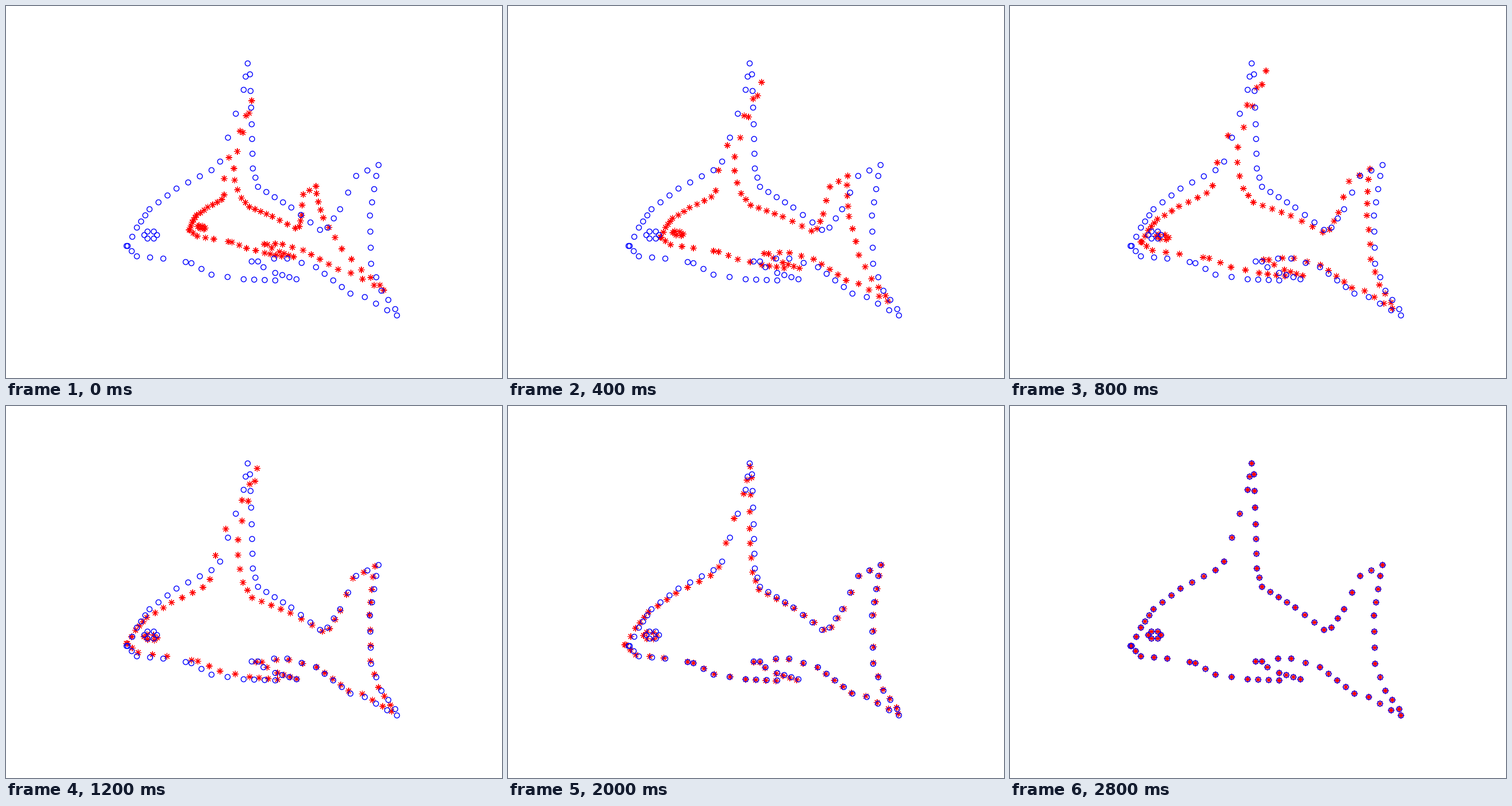
A matplotlib script that plays this animation: 864 px wide and 648 px high, repeating every 3800 ms.

```python
import matplotlib.pyplot as plt
import numpy as np
from matplotlib.animation import FuncAnimation

WIDTH, HEIGHT, DPI = 864, 648, 108
STEP_MS, LOOP_MS = 100, 3800
KEY_MS = np.array([0, 800, 1600, 2600])

# Corners of the fish as (mark number, x, y); marks between are evenly spaced.
FRONT = [(0, 212, 418), (2, 228, 386), (5, 250, 354), (8, 297, 318),
         (11, 358, 286), (12, 373, 271), (15, 414, 146), (17, 421, 100)]
BACK = [(1, 425, 119), (2, 426, 148), (4, 428, 206), (7, 430, 283),
        (9, 439, 315), (13, 497, 351), (16, 547, 390), (17, 560, 386),
        (19, 582, 354), (21, 610, 296), (23, 649, 277)]
TAIL = [(1, 645, 296), (4, 634, 365), (7, 636, 449), (9, 654, 496),
        (11, 678, 528), (12, 681, 539)]
UNDERSIDE = [(1, 664, 530), (3, 625, 507), (4, 600, 501), (8, 540, 455),
             (10, 490, 440), (11, 467, 440), (12, 439, 445), (13, 428, 445),
             (15, 469, 465), (18, 506, 476)]
BELLY = [(0, 469, 478), (3, 414, 476), (5, 358, 468), (7, 323, 448),
         (8, 313, 446), (9, 274, 440), (11, 228, 436), (13, 210, 418)]

# Anchor on the fish -> how far the moving copy is from it at the key times;
# at the last key time it has arrived.
SHIFTS = {
    (421, 100): [(7, 65), (25, 13), (5, 10)],
    (428, 206): [(-31, 77), (-31, 40), (-15, 17)],
    (373, 271): [(7, 58), (-20, 42), (-11, 20)],
    (439, 315): [(-15, 35), (-15, 27), (-5, 11)],
    (547, 390): [(-43, -3), (-2, 4), (5, 0)],
    (649, 277): [(-109, 37), (-22, 7), (-1, 1)],
    (636, 419): [(-63, -17), (-8, -6), (1, -3)],
    (681, 539): [(-23, -44), (-15, -12), (-4, -6)],
    (506, 476): [(-5, -39), (4, -6), (-4, 1)],
    (358, 468): [(61, -46), (27, -13), (6, -3)],
    (210, 418): [(109, -28), (18, -7), (-7, -4)],
    (267, 345): [(73, 17), (4, 22), (-6, 12)],
}


def chain(corners):
    """Marks numbered from the first corner to the last."""
    number, x, y = np.array(corners, float).T
    marks = np.arange(number[0], number[-1] + 1)
    return np.column_stack([np.interp(marks, number, x), np.interp(marks, number, y)])


def ring(x, y, rx, ry, count):
    angle = np.arange(count) * 2 * np.pi / count
    return np.column_stack([x + rx * np.cos(angle), y + ry * np.sin(angle)])


def spline_kernel(a, b):
    """Thin-plate kernel r^2 log r between two point sets."""
    r2 = ((a[:, None] - b[None]) ** 2).sum(axis=2)
    return 0.5 * r2 * np.log(np.maximum(r2, 1e-12))


def spread_matrix(points, anchors):
    """Matrix that carries shifts at the anchors over to all points."""
    points, anchors = points / 100, anchors / 100
    n = len(anchors)
    affine = np.column_stack([np.ones(n), anchors])
    system = np.block([[spline_kernel(anchors, anchors), affine],
                       [affine.T, np.zeros((3, 3))]])
    basis = np.column_stack([spline_kernel(points, anchors),
                             np.ones(len(points)), points])
    return (basis @ np.linalg.inv(system))[:, :n]


fish = np.vstack([chain(part) for part in (FRONT, BACK, TAIL, UNDERSIDE, BELLY)]
                 + [ring(252, 399, 11, 7, 6)])
anchors = np.array(list(SHIFTS), float)
shifts = np.array([path + [(0, 0)] for path in SHIFTS.values()], float).swapaxes(0, 1)
slopes = np.gradient(shifts, KEY_MS, axis=0, edge_order=2)
slopes[-1] = 0
spread = spread_matrix(fish, anchors)


def shift_at(ms):
    """Cubic Hermite interpolation of the anchor shifts."""
    ms = min(ms, KEY_MS[-1])
    k = min(np.searchsorted(KEY_MS, ms, side="right") - 1, len(KEY_MS) - 2)
    span = KEY_MS[k + 1] - KEY_MS[k]
    u = (ms - KEY_MS[k]) / span
    blend = u * u * (3 - 2 * u)
    return ((1 - blend) * shifts[k] + blend * shifts[k + 1]
            + span * u * (1 - u) * ((1 - u) * slopes[k] - u * slopes[k + 1]))


fig = plt.figure(figsize=(WIDTH / DPI, HEIGHT / DPI), dpi=DPI, facecolor="white")
ax = fig.add_axes([0, 0, 1, 1])
ax.set_xlim(0, WIDTH)
ax.set_ylim(HEIGHT, 0)
ax.axis("off")


def draw_marks(marker, size, color, line_width):
    # Unfilled collections are placed at sub-pixel positions.
    marks = ax.scatter(*fish.T, s=size ** 2, marker=marker)
    marks.set(facecolor="none", edgecolor=color, linewidth=line_width, clip_on=False)
    return marks


stars = draw_marks((8, 2, 0), 7, "#ff0000", 0.75)
draw_marks("o", 6, "#0000ff", 0.95)


def update(frame):
    stars.set_offsets(fish + spread @ shift_at(frame * STEP_MS))
    return stars,


anim = FuncAnimation(fig, update, frames=LOOP_MS // STEP_MS, interval=STEP_MS,
                     repeat=True, repeat_delay=0, blit=False)
plt.show()
```
